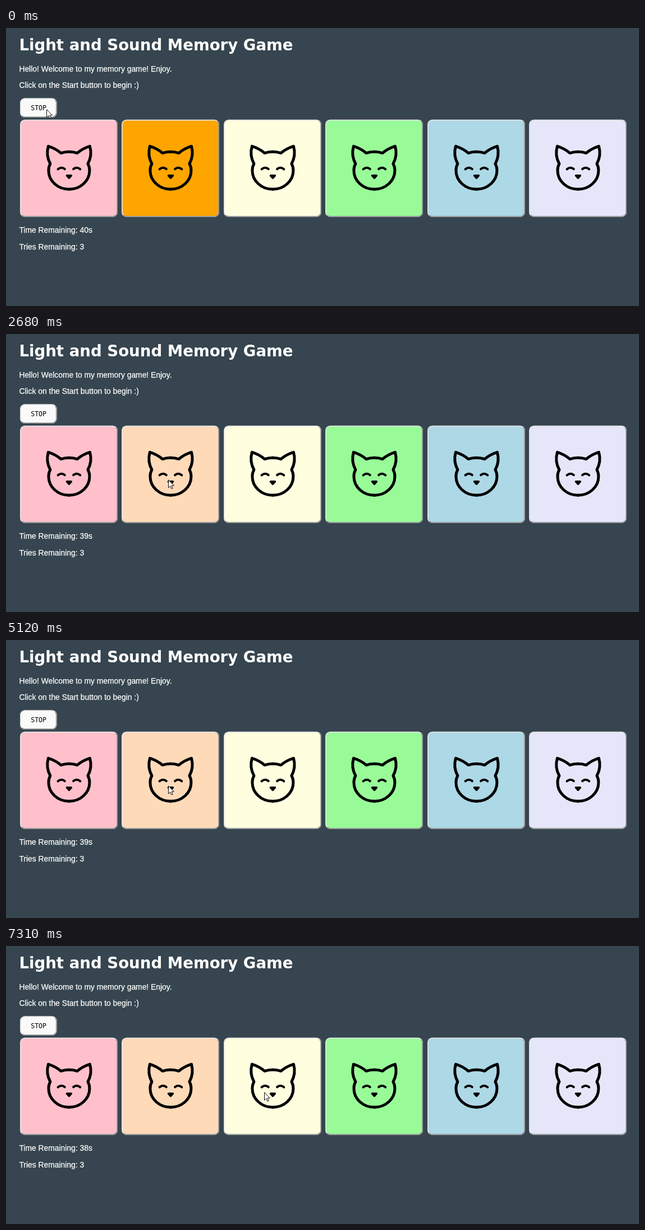
These frames come from a looping animation (1128x497 px, 8000 ms). An HTML page with a canvas:

```html
<!DOCTYPE html>
<html lang="en">
<head>
<meta charset="utf-8">
<title>Light and Sound Memory Game</title>
<style>
html, body { margin: 0; width: 100%; height: 100%; overflow: hidden; background: #36454f; }
canvas { display: block; }
</style>
</head>
<body>
<canvas id="stage" width="1128" height="497"></canvas>
<script>
const ctx = document.getElementById('stage').getContext('2d');
const LOOP = 8000, FLASH = 530, GAP = 300, STEP = 137;
const SCALE = 0.867;              // page zoom
const BORDER = 1.8, RADIUS = 10 * SCALE;
const LIGHT = '#e3e3e3', DARK = '#969696';
const CARD = { x: 25, y: 163.8, size: 174, pitch: 181.4 };
const COLORS = ['pink', 'peachpuff', 'lightyellow', 'palegreen', 'lightblue', 'lavender'];
const LIT = { 1: 'orange', 2: 'yellow' };

// The game plays its clues at an even beat; the player answers by pressing.
const flash = (card, from, length = FLASH) => ({ card, from, to: from + length });
const playback = (start, ...cards) => cards.map((card, i) => flash(card, start + i * (FLASH + GAP)));
const clues = [flash(1, 0, 680), ...playback(3750, 1, 2)];
const presses = [flash(1, 1860, 820), flash(1, 5770, 460), flash(2, 6750, 560)];
const active = (list, t) => list.find(f => t >= f.from && t < f.to)?.card;

// The pointer is sampled every STEP ms while it glides between its stops.
const stops = [{ x: 72, y: 145 }, { x: 289, y: 260 }, { x: 460, y: 261 }];
const glides = [{ from: 1050, steps: 4 }, { from: 6360, steps: 3 }];
const smooth = p => p ** 3 * (p * (6 * p - 15) + 10);

function pointer(t) {
  const pos = { ...stops[0] };
  glides.forEach(({ from, steps }, i) => {
    const done = Math.floor((t - from) / STEP) + 1;
    const p = smooth(Math.min(1, Math.max(0, done / steps)) ** 0.8);
    pos.x += (stops[i + 1].x - stops[i].x) * p;
    pos.y += (stops[i + 1].y - stops[i].y) * p;
  });
  return pos;
}

// One second passes with the first press and one as the pointer moves on.
const secondsLeft = t => 40 - (t >= presses[0].from) - (t >= glides[1].from);

// Right half of the cat around x = 0, y from the top of the card.
const halfHead = new Path2D(`M0 57.4 Q8 57.4 14.5 59.8 Q24 51.5 37 47.5
  Q41.7 64 33.5 79 Q36.5 84 36.5 91 A36.5 33.5 0 0 1 0 124.5`);
const eye = new Path2D('M19.8 88.6 Q13.5 83.5 7.7 88.3');
const nose = new Path2D('M-4 100 H4 L0 104.5Z');
const arrow = new Path2D('M0 0 V16.2 L3.8 12.7 L6.3 18.4 L8.8 17.3 L6.3 11.7 H11.4Z');

function stroke(path, width) {
  ctx.lineWidth = width;
  ctx.stroke(path);
}

function roundBox(x, y, w, h, r, color) {
  ctx.fillStyle = color;
  ctx.beginPath();
  ctx.roundRect(x, y, w, h, r);
  ctx.fill();
}

function bevel(x, y, w, h, fill, pressed) {
  const k = Math.min(w, h) / 2;
  roundBox(x, y, w, h, RADIUS, pressed ? DARK : LIGHT);
  ctx.save();
  ctx.beginPath();
  ctx.moveTo(x + w, y);
  ctx.lineTo(x + w, y + h);
  ctx.lineTo(x, y + h);
  ctx.lineTo(x + k, y + h - k);
  ctx.lineTo(x + w - k, y + k);
  ctx.clip();
  roundBox(x, y, w, h, RADIUS, pressed ? LIGHT : DARK);
  ctx.restore();
  roundBox(x + BORDER, y + BORDER, w - 2 * BORDER, h - 2 * BORDER, RADIUS - BORDER, fill);
}

function cat(x, y) {
  ctx.save();
  ctx.translate(x, y);
  ctx.strokeStyle = ctx.fillStyle = '#000';
  ctx.lineJoin = ctx.lineCap = 'round';
  for (let side = 0; side < 2; side++) {
    stroke(halfHead, 5);
    stroke(eye, 4);
    ctx.scale(-1, 1);
  }
  ctx.fill(nose);
  stroke(nose, 3.4);
  ctx.restore();
}

function cursor({ x, y }) {
  ctx.save();
  ctx.translate(x + 0.5, y + 0.8);
  ctx.scale(SCALE, SCALE);
  ctx.fillStyle = '#fff';
  ctx.strokeStyle = '#000';
  ctx.fill(arrow);
  stroke(arrow, 1.1);
  ctx.restore();
}

function text(str, x, y, font, color = '#fff') {
  ctx.font = font;
  ctx.fillStyle = color;
  ctx.fillText(str, x, y);
}

// Body copy gets a hairline outline so its stems read as full white.
function line(str, y) {
  text(str, 23.4, y, `${16 * SCALE}px "Liberation Sans", Arial, sans-serif`);
  ctx.strokeStyle = '#fff';
  ctx.lineWidth = 0.25;
  ctx.strokeText(str, 23.4, y);
}

function draw(t) {
  const pressed = active(presses, t);
  const lit = pressed ?? active(clues, t);
  ctx.fillStyle = '#36454f';
  ctx.fillRect(0, 0, 1128, 497);

  text('Light and Sound Memory Game', 23.4, 40, 'bold 27.6px "DejaVu Sans", Verdana, sans-serif');
  line('Hello! Welcome to my memory game! Enjoy.', 78);
  line('Click on the Start button to begin :)', 107);

  bevel(25, 125.2, 65.7, 34.8, '#fafafa', false);
  text('STOP', 44.2, 147.2, '11.56px "DejaVu Sans Mono", monospace', '#000');

  COLORS.forEach((color, i) => {
    const x = Math.round(CARD.x + i * CARD.pitch);
    bevel(x, CARD.y, CARD.size, CARD.size, i === lit ? LIT[i] : color, i === pressed);
    cat(x + CARD.size / 2 + 0.4, CARD.y);
  });

  line(`Time Remaining: ${secondsLeft(t)}s`, 366);
  line('Tries Remaining: 3', 396);
  cursor(pointer(t));
}

const begin = performance.now();
function tick() {
  draw((performance.now() - begin) % LOOP);
  requestAnimationFrame(tick);
}
tick();
</script>
</body>
</html>
```
